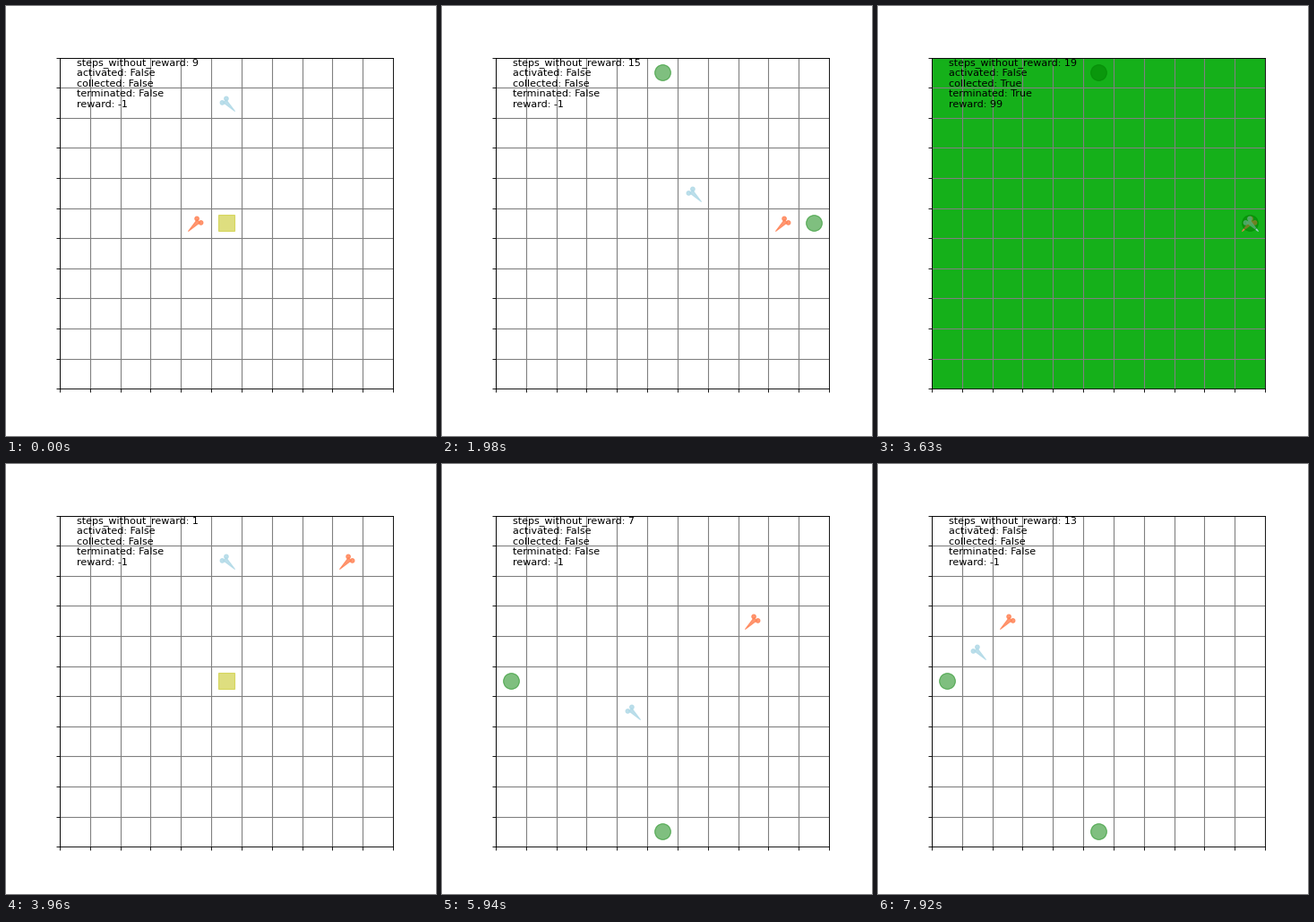
Animation of 480x480 px, one loop 8 s. Source, as a matplotlib script:

```python
import matplotlib.pyplot as plt
from matplotlib.animation import FuncAnimation
from matplotlib.path import Path
from matplotlib.transforms import Affine2D

CELLS = 11
STEP_MS = 330
LOOP_MS = 8000
TICK_MS = 20

MOVES = {"U": (0, -1), "D": (0, 1), "L": (-1, 0), "R": (1, 0), ".": (0, 0)}


def walk(start, moves):
    """List of cells visited, one per step."""
    cells = [start]
    for m in moves:
        x, y = cells[-1]
        dx, dy = MOVES[m]
        cells.append((x + dx, y + dy))
    return cells


def episode(coral, blue, goals, activated_at, first_count, success):
    states = []
    last = len(coral) - 1
    for i, (c, b) in enumerate(zip(coral, blue)):
        won = success and i == last
        states.append(dict(
            coral=c, blue=b, won=won,
            goals=goals if i >= activated_at else [],
            activated=i == activated_at,
            count=first_count + i - won,
        ))
    return states


STATES = episode(
    walk((4, 5), "RRRRR.DU.R."), walk((5, 1), "..DDDRRDRRR"),
    [(5, 0), (10, 5)], activated_at=1, first_count=9, success=True,
) + episode(
    walk((9, 1), "D...LDLLLLLL"), walk((5, 1), "DDDDDLLLL.UU"),
    [(0, 5), (5, 10)], activated_at=4, first_count=1, success=False,
)

fig, ax = plt.subplots(figsize=(6, 6), dpi=80)
ax.set_xlim(0, CELLS)
ax.set_ylim(CELLS, 0)
ax.set_xticks(range(CELLS + 1), labels=[])
ax.set_yticks(range(CELLS + 1), labels=[])
ax.grid(color="gray", linewidth=1)

# two round lobes and a body tapering to a thin tail
blue_shape = Path.make_compound_path(
    Path.circle((-5.2, 0.6), 2.3),
    Path.circle((-0.6, 5.2), 2.3),
    Path([(-4, 0.8), (9, -9), (-0.8, 4), (-4, 0.8)], closed=True),
)
coral_shape = blue_shape.transformed(Affine2D().scale(-1, 1))


def piece(marker, color, alpha, zorder):
    return ax.plot([], [], linestyle="none", marker=marker, color=color,
                   markersize=16, alpha=alpha, zorder=zorder)[0]


coral = piece(coral_shape, "coral", 0.8, 3)
blue = piece(blue_shape, "lightblue", 0.8, 3.1)
switch = piece("s", "y", 0.5, 3.2)
goals = piece("o", "g", 0.5, 3.3)
info = ax.text(0.05, 0.85, "", transform=ax.transAxes, zorder=4)


def place(artist, cells):
    artist.set_data([x + 0.5 for x, _ in cells], [y + 0.5 for _, y in cells])


def update(i):
    k = (i * TICK_MS + TICK_MS // 2) // STEP_MS
    s = STATES[min(k, len(STATES) - 1)]
    place(coral, [s["coral"]])
    place(blue, [s["blue"]])
    place(goals, s["goals"])
    place(switch, [] if s["goals"] else [(5, 5)])
    ax.set_facecolor("xkcd:green" if s["won"] else "white")
    info.set_text(
        f"steps_without_reward: {s['count']}\n"
        f"activated: {s['activated']}\n"
        f"collected: {s['won']}\n"
        f"terminated: {s['won']}\n"
        f"reward: {99 if s['won'] else -1}"
    )
    return coral, blue, switch, goals, info


anim = FuncAnimation(fig, update, frames=LOOP_MS // TICK_MS,
                     interval=TICK_MS, repeat=True, repeat_delay=0)
plt.show()
```
